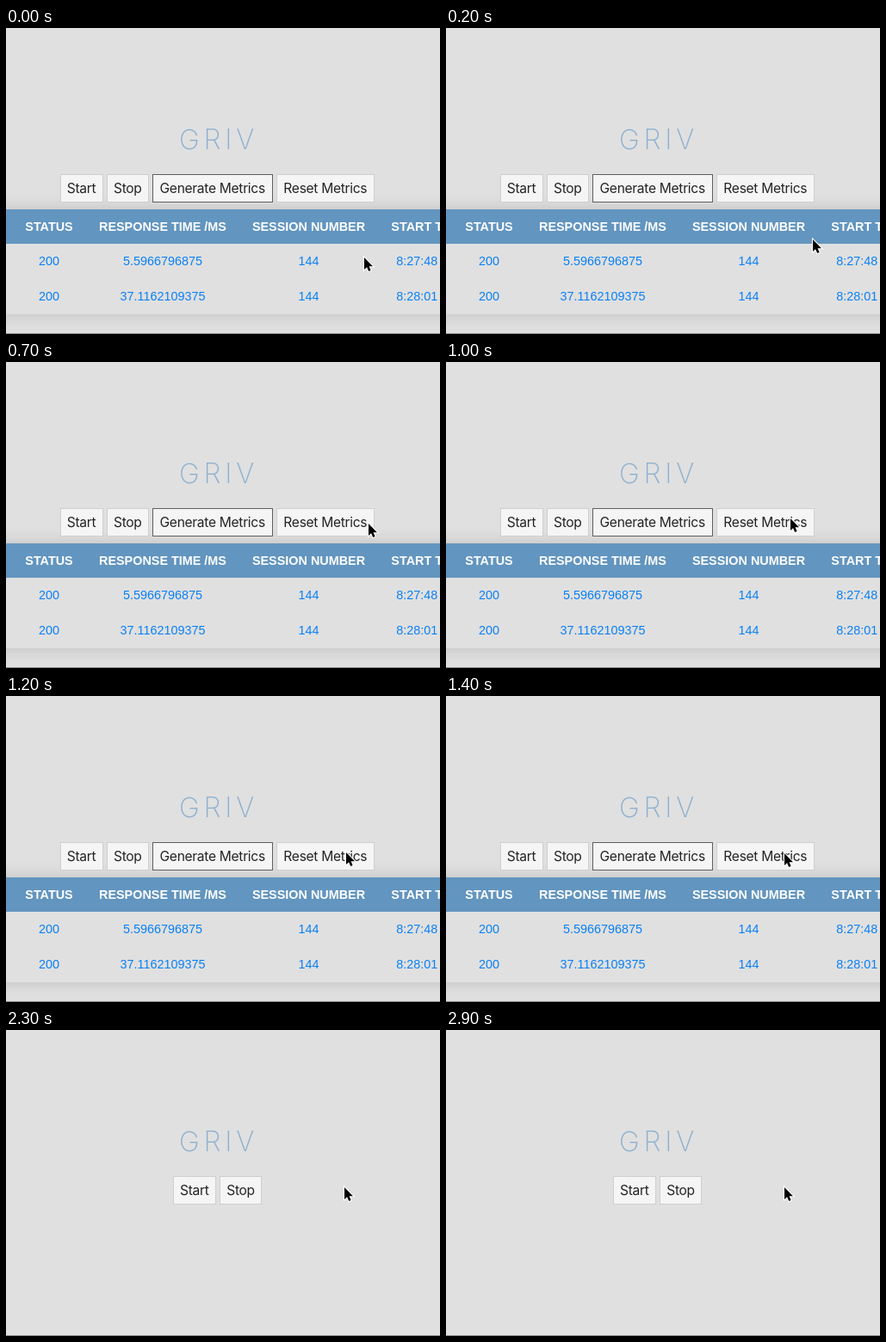
These frames come from a looping animation (504x356 px, 3200 ms). An HTML page:

```html
<!DOCTYPE html>
<html lang="en">
<head>
<meta charset="utf-8">
<title>Metrics panel</title>
<style>
  html, body { margin: 0; width: 100%; height: 100%; overflow: hidden; background: #e0e0e0; }
  svg { display: block; width: 504px; height: 356px; }

  .title { font: 200 32px Inter, sans-serif; letter-spacing: .15em; fill: #8db0cf; }

  .btn rect { fill: #f5f5f5; stroke: #cfcfcf; }
  .btn text { font: 400 15.6px Inter, sans-serif; letter-spacing: -.02em; fill: #242424; text-anchor: middle; }

  .table text { font: 400 14.4px "Liberation Sans", Arial, sans-serif; fill: #0a80f5; text-anchor: middle; }
  .table .head text { font-weight: 700; fill: #fff; }
  .head rect { fill: #6295bf; }
  .shadow { opacity: .15; filter: blur(10px); }

  .full, .idle, .btn.generate rect, .btn.reset rect, .cursor {
    animation: 3200ms step-end infinite;
  }
  .full { animation-name: full; }
  .idle { animation-name: idle; }
  .btn.generate rect { animation-name: blur-out; }
  .btn.reset rect { animation-name: press; }
  .cursor { animation-name: move; }

  /* 2200 ms = 68.75%, 2300 ms = 71.875% */
  @keyframes full { 0% { visibility: visible } 71.875%, 100% { visibility: hidden } }
  @keyframes idle { 0% { visibility: hidden } 71.875%, 100% { visibility: visible } }
  @keyframes blur-out { 0% { stroke: #5f5f5f } 68.75%, 100% { stroke: #cfcfcf } }
  @keyframes press {
    0% { fill: #f5f5f5; stroke: #cfcfcf }
    68.75%, 100% { fill: #dedede; stroke: #5f5f5f }
  }

  /* one step per 100 ms */
  @keyframes move {
    0%      { transform: translate(416px, 267px) }
    3.125%  { transform: translate(420px, 260px) }
    6.25%   { transform: translate(426px, 246px) }
    9.375%  { transform: translate(431px, 231px) }
    12.5%   { transform: translate(433px, 217px) }
    15.625% { transform: translate(431px, 204px) }
    18.75%  { transform: translate(427px, 194px) }
    21.875% { transform: translate(421px, 188px) }
    25%     { transform: translate(414px, 185px) }
    28.125% { transform: translate(406px, 183px) }
    31.25%  { transform: translate(400px, 182px) }
    34.375% { transform: translate(397px, 182px) }
    37.5%   { transform: translate(395px, 182px) }
    40.625% { transform: translate(394px, 183px) }
    43.75%, 100% { transform: translate(393px, 183px) }
  }
</style>
</head>
<body>
<svg viewBox="0 0 504 356">
  <rect width="504" height="356" fill="#e0e0e0"/>
  <text class="title" x="201" y="141">GRIV</text>

  <g class="full">
    <g class="table">
      <rect class="shadow" x="-60" y="211" width="624" height="122"/>
      <rect x="-60" y="211" width="624" height="122" fill="#e0e0e0"/>
      <g class="head">
        <rect y="211" width="504" height="40"/>
        <text x="50" y="236">STATUS</text>
        <text x="182" y="236">RESPONSE TIME /MS</text>
        <text x="351.5" y="236">SESSION NUMBER</text>
        <text x="490" y="236">START TIME</text>
      </g>
      <text x="50" y="276">200</text>
      <text x="182" y="276">5.5966796875</text>
      <text x="351.5" y="276">144</text>
      <text x="490" y="276">8:27:48 PM</text>
      <text x="50" y="317">200</text>
      <text x="182" y="317">37.1162109375</text>
      <text x="351.5" y="317">144</text>
      <text x="490" y="317">8:28:01 PM</text>
    </g>
    <g class="btn"><rect x="63.5" y="170.5" width="49" height="32"/><text x="87.5" y="192">Start</text></g>
    <g class="btn"><rect x="117.5" y="170.5" width="48" height="32"/><text x="141.3" y="192">Stop</text></g>
    <g class="btn generate"><rect x="170.5" y="170.5" width="139" height="32"/><text x="239.7" y="192">Generate Metrics</text></g>
    <g class="btn reset"><rect x="314.5" y="170.5" width="113" height="32"/><text x="370.8" y="192">Reset Metrics</text></g>
  </g>

  <g class="idle">
    <g class="btn"><rect x="194.5" y="170.5" width="49" height="32"/><text x="218.8" y="192">Start</text></g>
    <g class="btn"><rect x="248.5" y="170.5" width="48" height="32"/><text x="272.5" y="192">Stop</text></g>
  </g>

  <rect y="355" width="504" height="1" fill="#8c8c8c"/>

  <g class="cursor">
    <path d="M0 0V14L3.1 11.2 5.2 16 7.6 15 5.6 10.2H10Z" stroke="#fff" stroke-width="2" paint-order="stroke"/>
  </g>
</svg>
</body>
</html>
```
